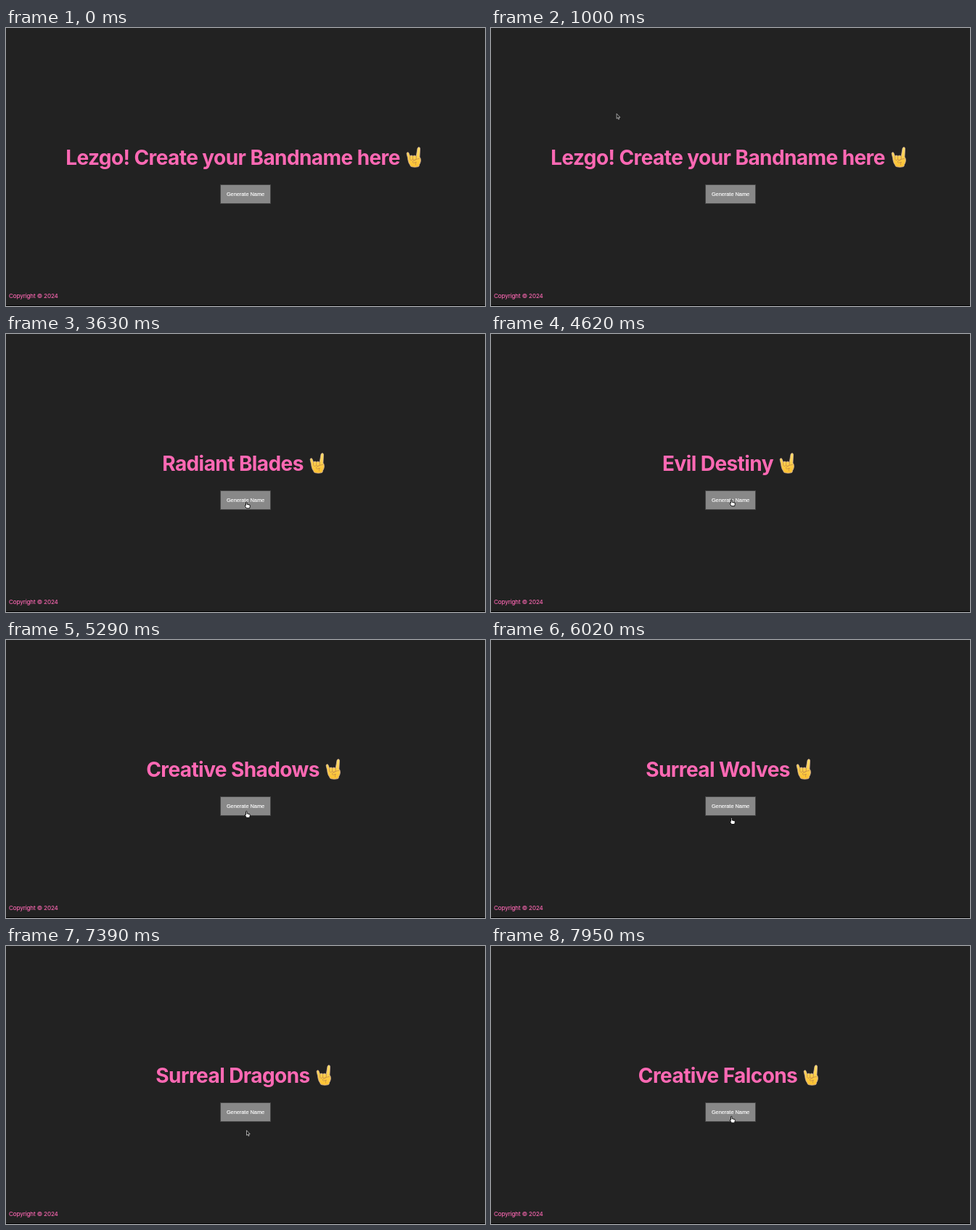
Write an HTML page that moves like this. It is 660 px wide and 384 px high and loops after 8000 ms.

```html
<!DOCTYPE html>
<html lang="en">
<head>
<meta charset="utf-8">
<title>Band name generator</title>
<style>
  html, body { margin: 0; width: 100%; height: 100%; overflow: hidden; background: #222; }
  #stage { position: relative; width: 660px; height: 384px; overflow: hidden; background: #222; }
  #stage > * { position: absolute; }
  h1 {
    left: 0; top: 162px; width: 660px; height: 34px; margin: 0;
    display: flex; justify-content: center; white-space: nowrap;
    font: 700 28px/34px Inter, sans-serif; letter-spacing: -.58px; color: #ff69b4;
  }
  h1 svg { flex: none; margin: 2px 0 0 7px; overflow: visible; }
  button {
    left: 296px; top: 217px; width: 68px; height: 25px; padding: 0; border: 0;
    background: #888; box-shadow: 0 0 0 1px #444; color: #fff; white-space: nowrap;
    font: 7.35px/25px "Liberation Sans", Arial, sans-serif;
    -webkit-text-stroke: .15px #fff;
  }
  footer {
    left: 4px; top: 365px; color: #ff69b4; white-space: nowrap;
    font: 8.1px/10px Inter, sans-serif; letter-spacing: -.12px;
    -webkit-text-stroke: .1px #ff69b4;
  }
  #edge { left: 0; top: 383px; width: 660px; height: 1px; background: #000; }
  #cursor { left: 0; top: 0; overflow: visible; }
</style>
</head>
<body>
<div id="stage">
  <h1><span id="name"></span>
    <svg width="28" height="30" viewBox="0 0 28 30" stroke-linecap="round" stroke-linejoin="round">
      <defs>
        <linearGradient id="skin" x1="0" y1="0" x2="0" y2="1">
          <stop offset="0" stop-color="#ffe06a"/>
          <stop offset="1" stop-color="#fcc02f"/>
        </linearGradient>
      </defs>
      <path fill="url(#skin)" stroke="#d8b4a0" stroke-width=".8"
        d="M6.6 25C4.4 22 4 19 3.6 15.5L2.2 9.8C1.7 7.5 4.5 6.9 5.2 9.2L6.7 13.4
           C7.4 11.8 9.8 11.7 10.6 13C11.8 11.7 14.4 11.9 15.2 13.4L17 2.5
           C17.4 0 20.8.1 20.5 2.8L19.9 14.2C22 16.4 21.9 21 19.6 24.4
           L18.9 27C17.4 28.5 9.2 28.6 7.6 27Z"/>
      <g fill="none" stroke="#c08a4c" stroke-width=".8">
        <path d="M6.7 13.4V17.4C7.4 19 9.9 19 10.6 17.2V13M10.6 17.2C11.6 19 14.4 19 15.2 17V13.4"/>
        <path d="M19.4 16.5C16.5 16.6 13.8 18 11.3 19.5C9.4 20.7 10.6 22.8 12.5 22.1L15.4 21.2C14.4 22.6 14.2 23.8 14.6 25"/>
      </g>
    </svg>
  </h1>
  <button tabindex="-1">Generate Name</button>
  <footer>Copyright © 2024</footer>
  <div id="edge"></div>
  <svg id="cursor" width="12" height="12" stroke-linejoin="round">
    <path id="hand" fill="#fff" stroke="#000" stroke-width=".9"
      d="M-1 4.9V.7C-1-.4.6-.4.6.7V3.2L3.5 3.9Q4.8 3.9 4.8 5V6.2L4.1 8.8H-.1L-2.4 5.3Q-2.2 4.1-1 4.9Z"/>
    <path id="arrow" fill="#111" stroke="#ddd" stroke-width=".7"
      d="M0 0V6.8L1.5 5.4L2.5 7.8L3.6 7.3L2.6 5H4.7Z"/>
  </svg>
</div>
<script>
  const LOOP = 8000;
  // time of each click and the name it brings up
  const names = [
    [0, "Lezgo! Create your Bandname here"],
    [2710, "Mystic Blades"],
    [3630, "Radiant Blades"],
    [4470, "Evil Destiny"],
    [4980, "Creative Shadows"],
    [5660, "Surreal Wolves"],
    [6400, "Bold Cyborgs"],
    [7000, "Surreal Dragons"],
    [7650, "Creative Falcons"],
    [8250, ""]
  ];
  const LAG = 20, REST = 260, DEPTH = 33;
  const $ = id => document.getElementById(id);
  const title = $("name"), cursor = $("cursor"), hand = $("hand"), arrow = $("arrow");

  const clickAt = t => names.findLastIndex(n => n[0] <= t);
  const ease = (t, from, to) => {
    const k = Math.min(1, Math.max(0, (t - from) / (to - from)));
    return k * k * (3 - 2 * k);
  };

  // Glide in to the button, then dip below it and return between clicks.
  function pointerAt(t) {
    const glide = ease(t, 0, 1930);
    const x = -8 + 353.5 * glide - 14 * ease(t, 2710, 3200);
    const y = 79 + 150 * glide * glide;
    const i = clickAt(t);
    if (i < 1) return [x, y];
    const begin = names[i][0] + REST;
    const k = Math.max(0, (t - begin) / (names[i + 1][0] - begin));
    return [x, y + DEPTH * Math.sin(Math.PI * k)];
  }

  function draw(t) {
    const text = names[clickAt(t)][1];
    if (title.textContent !== text) title.textContent = text;
    const [x, y] = pointerAt(Math.max(0, t - LAG));
    const over = x > 296 && x < 364 && y > 217 && y < 247;
    cursor.style.transform = `translate(${x}px, ${y}px)`;
    hand.style.display = over ? "" : "none";
    arrow.style.display = over ? "none" : "";
  }

  const start = performance.now();
  function tick() {
    draw((performance.now() - start) % LOOP);
    requestAnimationFrame(tick);
  }
  draw(0);
  requestAnimationFrame(tick);
</script>
</body>
</html>
```
